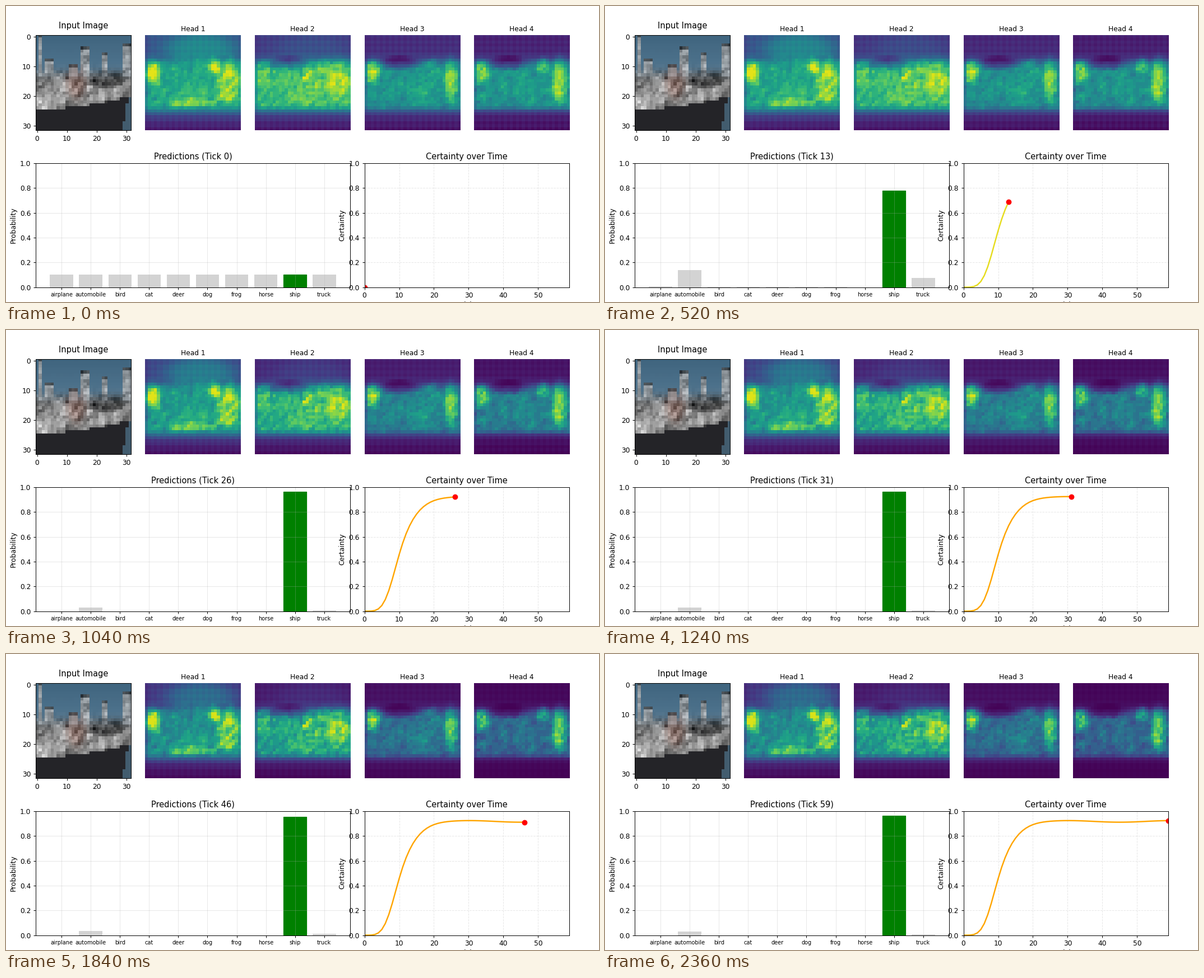
A matplotlib script that plays this animation: 1058 px wide and 529 px high, repeating every 2.4 s.

```python
import numpy as np
import matplotlib.pyplot as plt
from matplotlib.animation import FuncAnimation

TICKS, N = 60, 32
CLASSES = ["airplane", "automobile", "bird", "cat", "deer",
           "dog", "frog", "horse", "ship", "truck"]
SHIP = CLASSES.index("ship")

plt.rcParams["font.family"] = "DejaVu Sans"
rng = np.random.default_rng(7)
yy, xx = np.mgrid[0:N, 0:N].astype(float)


def sig(v):
    return 1 / (1 + np.exp(-v))


def bump(cx, cy, rx, ry):
    """Flat-topped soft ellipse."""
    return np.exp(-(((xx - cx) / rx) ** 2 + ((yy - cy) / ry) ** 2) ** 2)


def grain():
    """Noise that is slightly correlated between neighbours."""
    g = rng.normal(0, 1, (N, N))
    return (g + np.roll(g, 1, 0) + np.roll(g, 1, 1)) / np.sqrt(3)


def make_scene():
    """Blocky ship: blue sky, pale deck and masts, dark hull."""
    sky = np.array([64, 101, 127]) + 14 * (yy / 10).clip(0, 1)[..., None]
    light = (118 + 22 * grain() + 45 * bump(8, 19, 3, 5)
             - 45 * bump(23, 14, 6, 3) + 55 * bump(2, 22, 4, 4))
    edge = 24.4 - 0.0045 * xx ** 2
    light += 45 * np.exp(-((yy - edge + 2.5) / 2) ** 2) * (xx > 17)
    warm = bump(13, 15, 3.5, 6)
    deck = np.stack([light + 22 * warm, light, light - 6 * warm], -1)

    cover = sig((yy - 12) * 1.2)
    for x, top, width in [(1, 0, .7), (4, 8, 1.2), (12, 10, 1.8),
                          (16, 4, 1), (22.5, 6, 1.2), (30, 3, 1.2)]:
        mast = (abs(xx - x) <= width) & (yy >= top) & (yy < 14)
        cover[mast] = 0.8
        deck[mast] += 38 - 90 * (yy[mast, None] == top)
    img = sky + (deck - sky) * cover[..., None]

    hull = yy > edge
    img[hull] = (36, 36, 40)
    img[hull & (xx > 30.2 - 0.17 * (yy - 21))] = (66, 92, 110)
    return img.clip(0, 255).astype(np.uint8)


def make_head(top, level, low, wide=1, sky=0, left=0, mid=0, right=0,
              centre=0, keel=0, notch=0):
    """Attention map: bright band on a dark field with a few soft spots."""
    v = top + (level - top) * sig((yy - 8.5) / 0.9)
    v += sky * bump(18, 4, 12, 5)
    v += left * bump(2.2, 12, 2.4, 3.9)
    v += mid * bump(22.5, 10, 2.2, 2.8)
    v += right * bump(29.5 - 1.2 * wide, 15, 2.2 * wide, 7.5)
    v += centre * bump(17, 17, 6, 6)
    v += keel * bump(15, 22.3, 7, 1.6)
    v -= notch * bump(11, 9, 6, 2.2)
    under = low * np.exp(-(yy - 25).clip(0) / 3.5) + 0.02
    v = under + (v - under) * sig((24.4 - yy) / 0.5)
    active = sig((yy - 7) * 1.5) * sig((24.5 - yy) * 2)
    v *= 1 + 0.075 * active * grain()
    v += 0.012 * (1 - active) * (np.cos(np.pi * xx) + np.cos(np.pi * yy))
    v[:, 0] *= 0.8
    return v.clip(0.005, 0.96)


# each map with the strength of its later darkening
HEADS = [
    (make_head(0.27, 0.60, 0.32, 1.7, sky=.2, left=.34, mid=.3, right=.30,
               centre=.05, keel=.24), 0.42),
    (make_head(0.18, 0.68, 0.28, 1.9, sky=.06, left=.08, mid=.1, right=.2,
               centre=.09, notch=.2), 0.55),
    (make_head(0.13, 0.51, 0.20, 1.0, left=.36, mid=.13, right=.30,
               centre=.06, notch=.22), 0.60),
    (make_head(0.10, 0.51, 0.13, 1.2, left=.34, mid=.22, right=.36,
               centre=.04, notch=.22), 0.75),
]

# steep rise around tick 10, then a slow ripple
ticks = np.arange(TICKS)
pace = np.log(np.maximum(ticks, 0.1) / 10)
plateau = 0.9185 + 0.0065 * np.cos(2 * np.pi * ticks / 30)
certainty = plateau * sig(4.25 * pace + 3.1 * pace.clip(0) ** 4)

# softmax of one fixed leaning; certainty is 1 - normalised entropy
LEAN = np.array([-1.84, -.64, -2.5, -2.5, -2.8, -2.8, -3, -3.3, 0, -.86])


def softmax(gain):
    p = np.exp(gain * LEAN)
    return p / p.sum()


def sureness(gain):
    p = softmax(gain)
    return 1 + (p * np.log(p + 1e-30)).sum() / np.log(len(p))


GAINS = np.linspace(0, 8, 400)
SURENESS = [sureness(g) for g in GAINS]


def probabilities(t):
    return softmax(np.interp(certainty[t], SURENESS, GAINS))


fig = plt.figure(figsize=(12.023, 6.0115), dpi=88, facecolor="white")
grid = fig.add_gridspec(2, 5, left=0.05, right=0.95, bottom=0.05, top=0.95,
                        wspace=0.15, hspace=0.15)

ax = fig.add_subplot(grid[0, 0])
ax.imshow(make_scene(), interpolation="nearest")
ax.set_xticks(range(0, 31, 10))
ax.set_yticks(range(0, 31, 10))
ax.set_title("Input Image", fontsize=12, pad=10)

maps = []
for k, (field, _) in enumerate(HEADS, 1):
    ax = fig.add_subplot(grid[0, k])
    maps.append(ax.imshow(field, cmap="viridis", vmin=0, vmax=1,
                          interpolation="nearest"))
    ax.set_title(f"Head {k}", fontsize=10)
    ax.axis("off")

pred = fig.add_subplot(grid[1, :3])
bars = pred.bar(CLASSES, probabilities(0), color="lightgray")
bars[SHIP].set_color("green")
pred.tick_params(axis="x", labelsize=8)
pred.set_ylabel("Probability")
pred.grid(True, alpha=0.3)

cert = fig.add_subplot(grid[1, 3:])
curve, = cert.plot([], [], lw=2)
dot, = cert.plot([], [], "ro", ms=7)
cert.set_xlim(0, TICKS - 1)
cert.set_xlabel("Tick", labelpad=3)
cert.set_ylabel("Certainty")
cert.set_title("Certainty over Time", fontsize=12)
cert.grid(True, alpha=0.3, linestyle="--")

for ax in (pred, cert):
    ax.set_ylim(0, 1)


def update(t):
    u = np.clip((t - 3) / 54, 0, 1)
    fade = u * u * (3 - 2 * u)
    for im, (field, strength) in zip(maps, HEADS):
        im.set_data(field ** (1 + strength * fade))
    for bar, p in zip(bars, probabilities(t)):
        bar.set_height(p)
    pred.set_title(f"Predictions (Tick {t})", fontsize=12)
    curve.set_data(ticks[:t + 1], certainty[:t + 1])
    curve.set_color("#e6dc1e" if t < 26 else "orange")
    dot.set_data([t], [certainty[t]])
    return [*maps, *bars, curve, dot]


anim = FuncAnimation(fig, update, frames=TICKS, interval=40,
                     repeat=True, repeat_delay=0, blit=False)
plt.show()
```
